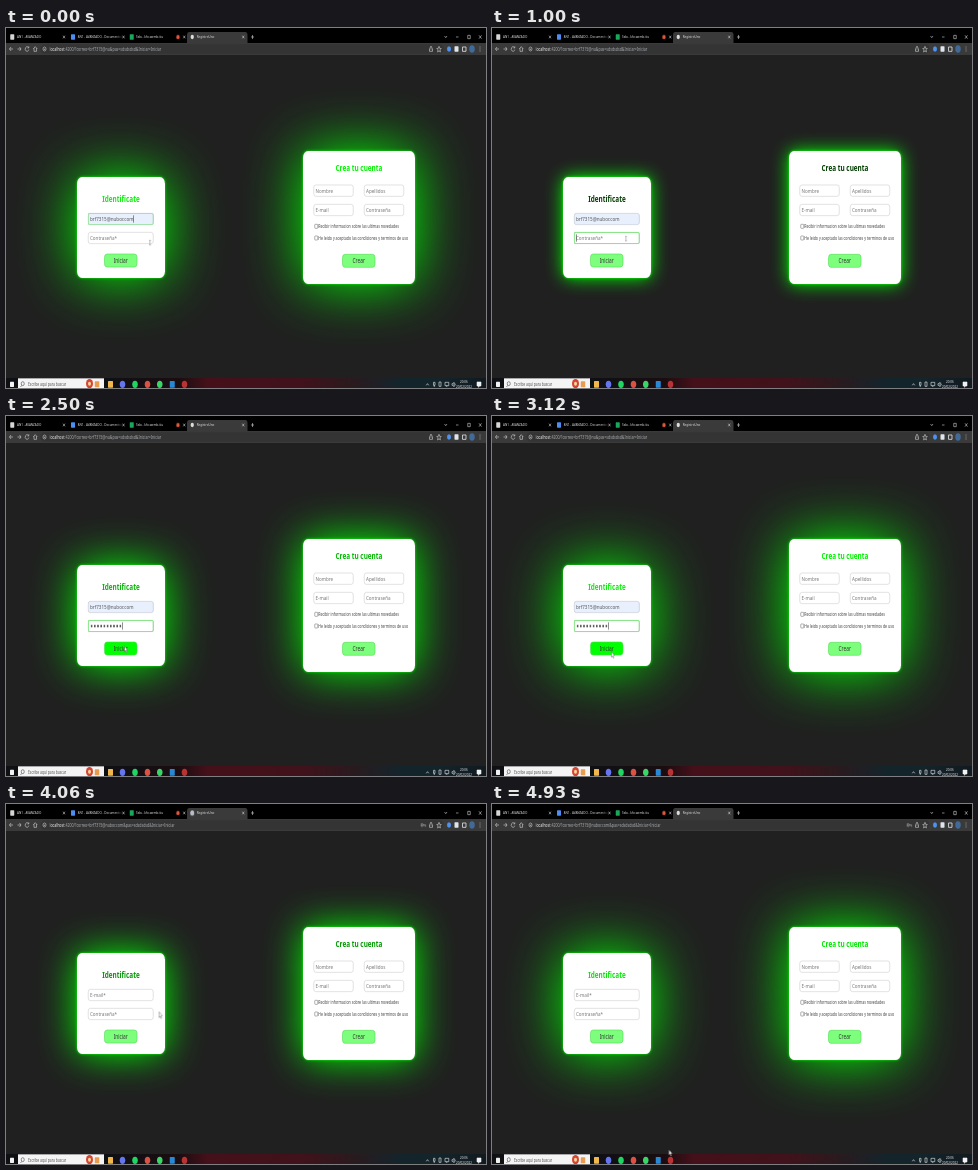
An HTML page for the animation above (5 s loop, 480 by 360 pixels).

```html
<!DOCTYPE html>
<html lang="es">
<head>
<meta charset="utf-8">
<title>RegistroUno</title>
<style>
@property --g { syntax: "<number>"; inherits: true; initial-value: 1; }

html, body { margin: 0; width: 100%; height: 100%; overflow: hidden; background: #202020; }

/* A 1920 x 1080 desktop squeezed into a 4:3 stage */
#desk {
  position: absolute; left: 0; top: 0; width: 1920px; height: 1080px;
  transform: scale(.25, .3333333); transform-origin: 0 0;
  overflow: hidden; background: #202020;
  font: 18.2px/1 "Noto Sans", "Open Sans", sans-serif;
  animation: glow 5s infinite;
}
#desk * { position: absolute; box-sizing: border-box; white-space: nowrap; }
#desk svg * { position: static; }

/* The page reloads at 64% and the glow starts over */
@keyframes glow {
  0% { --g: 1; animation-timing-function: ease-in-out; }
  30.4% { --g: 0; animation-timing-function: ease-in-out; }
  60.4% { --g: 1; animation-timing-function: ease-in; }
  64% { --g: .97; animation-timing-function: step-end; }
  64.01% { --g: 0; animation-timing-function: ease-in-out; }
  94% { --g: 1; animation-timing-function: ease-in; }
  100% { --g: .92; }
}

.t { left: calc(var(--x) * 1px); top: calc(var(--y) * 1px); transform: translateY(-50%); line-height: 1.3; }
.mid { left: 0; width: 100%; text-align: center; }
.dot, .sq {
  left: calc(var(--x) * 1px); top: calc(var(--y) * 1px);
  width: var(--s, 16px); height: var(--s, 16px);
  transform: translate(-50%, -50%); background: var(--c);
}
.dot { border-radius: 50%; }
.sq { border-radius: 2px; }

/* Browser */
#tabs { left: 0; top: 0; width: 1920px; height: 46px; background: #000; font-size: 12px; color: #dcdee1; }
#active { left: 724px; top: 12px; width: 242px; height: 34px; border-radius: 8px 8px 0 0; background: #3a3a3a; }
#bar { left: 0; top: 45px; width: 1920px; height: 36px; background: #3a3a3a; }
#omni { left: 138px; top: 4px; width: 1612px; height: 28px; border-radius: 14px; background: #343434; }
#bar .t { font-size: 14.2px; color: #a9acb0; }
#bar b { position: static; font-weight: 400; color: #f0f0f0; }
.cut { width: 180px; overflow: hidden; -webkit-mask: linear-gradient(90deg, #000 85%, transparent); mask: linear-gradient(90deg, #000 85%, transparent); }
.line { left: 0; top: 0; fill: none; stroke: #d5d7da; stroke-width: 2; }

/* Forms */
.card {
  border-radius: 20px; background: #fff;
  box-shadow: 0 0 10px #0f0, 0 0 calc(20px + var(--g) * 180px) #0f0;
}
#login { left: 284px; top: 447px; width: 352px; height: 303px; }
#join { left: 1188px; top: 369px; width: 448px; height: 399px; }
.card h2 { margin: 0; font-size: 25.6px; font-weight: 600; color: rgb(0 calc(var(--g) * 245) 0); }
.in {
  left: calc(var(--x) * 1px); top: calc(var(--y) * 1px); width: 160px; height: 36px;
  border: 2px solid #cecece; border-radius: 9px; background: #fff;
  color: #777; line-height: 31px; padding-left: 6px;
}
#login .in { width: 262px; }
.btn {
  left: calc(var(--x) * 1px); top: calc(var(--y) * 1px); width: 132px; height: 41px;
  border: 2px solid #50dc50; border-radius: 11px; background: #7dff7d;
  color: #333; font-size: 19.3px; line-height: 36px; text-align: center;
}
.box { left: 46px; width: 14px; height: 14px; border: 2px solid #777; border-radius: 3px; transform: translateY(-50%); }
.terms { font-size: 14.2px; color: #444; }

.full { inset: -2px; border-radius: 9px; border: 2px solid #c6cbd6; background: #e8f0fe; color: #555; line-height: 31px; padding-left: 6px; }
.focus { inset: -2px; border: 2px solid #2be32b; border-radius: 4px; }
.focus.first { border-color: #6fe66f; }
.caret { top: 5px; height: 22px; border-left: 2px solid #222; }
#dots {
  left: 6px; top: 5px; height: 22px; border-right: 2px solid #222;
  background: radial-gradient(circle, #222 3px, transparent 3.8px) 0 0 / 12.8px 22px;
  animation: type 5s infinite, pass 5s step-end infinite;
}
@keyframes type {
  0%, 21.6% { width: 2px; animation-timing-function: steps(10); }
  40.8%, 100% { width: 130px; }
}
@keyframes pass { 0% { opacity: 0; } 12% { opacity: 1; } 64%, 100% { opacity: 0; } }
@keyframes before { 0% { opacity: 1; } 64%, 100% { opacity: 0; } }
@keyframes after { 0% { opacity: 0; } 64%, 100% { opacity: 1; } }
@keyframes first { 0% { opacity: 1; } 12%, 100% { opacity: 0; } }
@keyframes hint { 0% { opacity: 1; } 23.5% { opacity: 0; } 64%, 100% { opacity: 1; } }
@keyframes hover { 0% { background: #7dff7d; } 31% { background: #0f0; } 78%, 100% { background: #7dff7d; } }
@keyframes rec { 0% { opacity: 1; } 30% { opacity: .15; } 38%, 100% { opacity: 1; } }
@keyframes globe { 0% { opacity: 0; } 64% { opacity: 1; } 92%, 100% { opacity: 0; } }
@keyframes beam { 0% { opacity: 1; } 26%, 100% { opacity: 0; } }
@keyframes arrow { 0% { opacity: 0; } 26%, 100% { opacity: 1; } }
.before, .after, .first, .hint, .hover, .rec, .globe, .pass, .beam, .arrow {
  animation: 5s step-end infinite;
}
.before { animation-name: before; }
.after { animation-name: after; }
.first { animation-name: first; }
.hint { animation-name: hint; }
.hover { animation-name: hover; }
.rec { animation-name: rec; }
.globe { animation-name: globe; }
.pass { animation-name: pass; }
.beam { animation-name: beam; }
.arrow { animation-name: arrow; }

/* Taskbar */
#task { left: 0; top: 1050px; width: 1920px; height: 30px; background: linear-gradient(90deg, #0e1014 20%, #1a0d10 36%, #45101a 42%, #40121b 62%, #2a1a1e 72%, #14242b 82%, #14242b 90%, #101a20); color: #eee; font-size: 12px; }
#find { left: 48px; top: 1px; width: 344px; height: 29px; background: #f4f4f4; }
#find .t { font-size: 13.3px; color: #555; }

#mouse { left: 0; top: 0; width: 24px; height: 26px; overflow: visible; animation: move 5s ease-in-out infinite; }
@keyframes move {
  0%, 5% { transform: translate(576px, 642px); }
  12%, 22% { transform: translate(536px, 630px); }
  32%, 41% { transform: translate(512px, 706px); }
  48%, 56% { transform: translate(474px, 690px); }
  64%, 76% { transform: translate(478px, 708px); }
  86%, 90% { transform: translate(728px, 551px); }
  98%, 100% { transform: translate(708px, 1037px); }
}
</style>
</head>
<body>
<div id="desk">
  <div id="tabs">
    <div id="active"></div>
    <i class="sq" style="--x:25;--y:27;--c:#d6d6d6"></i>
    <span class="t" style="--x:44;--y:27">AN1 - AVANZADO</span>
    <i class="sq" style="--x:268;--y:27;--c:#4b8df0"></i>
    <span class="t cut" style="--x:286;--y:27">AN1 - AVANZADO - Documentos de clase</span>
    <i class="sq" style="--x:503;--y:27;--c:#19a75a"></i>
    <span class="t" style="--x:520;--y:27">Sala - kfo-wemb-tiu</span>
    <i class="dot rec" style="--x:688;--y:27;--c:#e8593e;--s:13px"></i>
    <i class="dot" style="--x:745;--y:27;--c:#ddd;--s:13px"></i>
    <i class="dot globe" style="--x:745;--y:27;--c:#b9bec5"></i>
    <span class="t" style="--x:763;--y:27">RegistroUno</span>
    <svg class="line" width="1920" height="46">
      <path d="M228 23l8 8m0-8l-8 8M466 23l8 8m0-8l-8 8M709 23l8 8m0-8l-8 8M945 23l8 8m0-8l-8 8M980 27h12m-6-6v12"/>
      <path d="M1754 24l5 5 5-5M1800 27h10M1847 22h10v10h-10zM1892 22l10 10m0-10l-10 10"/>
    </svg>
  </div>
  <div id="bar">
    <div id="omni"></div>
    <svg class="line" width="1920" height="36">
      <path d="M28 18H14m6-6l-6 6 6 6M46 18h14m-6-6l6 6-6 6M90 14a7 7 0 1 0 1 6m0-10v5h-5M109 18l8-7 8 7m-13-2v9h10v-9"/>
      <circle cx="154" cy="18" r="6"/><path d="M154 17v4"/>
      <path d="M1694 16v9h12v-9m-6 4V10m-4 4l4-4 4 4"/>
      <path d="M1732 10l2.5 6 6.5.5-5 4 1.6 6.5-5.6-3.5-5.6 3.5 1.6-6.5-5-4 6.5-.5z"/>
      <path d="M1826 12h14v13h-14zM1896 11v2m0 4v2m0 4v2" stroke-width="3"/>
      <g class="after"><circle cx="1664" cy="18" r="4"/><path d="M1668 18h10v5"/></g>
    </svg>
    <span class="t before" style="--x:174;--y:18"><b>localhost</b>:4200/?correo=brf7315@nu&amp;pas=sdsdsdsd&amp;Iniciar=Iniciar</span>
    <span class="t after" style="--x:174;--y:18"><b>localhost</b>:4200/?correo=brf7315@nubor.com&amp;pas=sdsdsdsd&amp;Iniciar=Iniciar</span>
    <i class="dot" style="--x:1772;--y:18;--c:#4d92ef"></i>
    <i class="sq" style="--x:1802;--y:18;--c:#dfe5ec"></i>
    <i class="dot" style="--x:1864;--y:18;--c:#406b99;--s:22px"></i>
  </div>

  <div id="login" class="card">
    <h2 class="t mid" style="--y:66">Identificate</h2>
    <div class="in" style="--x:44;--y:108">E-mail*
      <div class="full before">brf7315@nubor.com<i class="caret first"></i></div>
      <div class="focus first"></div>
    </div>
    <div class="in" style="--x:44;--y:165"><span class="hint">Contraseña*</span>
      <div class="focus pass"></div>
      <div id="dots"></div>
    </div>
    <div class="btn hover" style="--x:109;--y:230">Iniciar</div>
  </div>

  <div id="join" class="card">
    <h2 class="t mid" style="--y:51">Crea tu cuenta</h2>
    <div class="in" style="--x:42;--y:101">Nombre</div>
    <div class="in" style="--x:244;--y:101">Apellidos</div>
    <div class="in" style="--x:42;--y:159">E-mail</div>
    <div class="in" style="--x:244;--y:159">Contraseña</div>
    <i class="box" style="top:226px"></i>
    <span class="t terms" style="--x:61;--y:227">Recibir informacion sobre las ultimas novedades</span>
    <i class="box" style="top:261px"></i>
    <span class="t terms" style="--x:61;--y:262">He leido y aceptado las condiciones y terminos de uso</span>
    <div class="btn" style="--x:157;--y:309">Crear</div>
  </div>

  <div id="task">
    <i class="sq" style="--x:24;--y:19;--c:#f2f2f2"></i>
    <div id="find">
      <span class="t" style="--x:40;--y:18">Escribe aquí para buscar</span>
      <svg class="line" width="344" height="29" style="stroke:#444"><circle cx="19" cy="16" r="6"/><path d="M15 21l-5 5"/></svg>
      <i class="dot" style="--x:286;--y:16;--c:#d8442f;--s:28px"></i>
      <i class="dot" style="--x:286;--y:16;--c:#f4d6a0;--s:12px"></i>
      <i class="sq" style="--x:316;--y:18;--c:#e99c50;--s:18px"></i>
    </div>
    <i class="sq" style="--x:418;--y:19;--c:#f0b84a;--s:20px"></i>
    <i class="dot" style="--x:466;--y:19;--c:#6575ef;--s:22px"></i>
    <i class="dot" style="--x:516;--y:19;--c:#20d663;--s:22px"></i>
    <i class="dot" style="--x:566;--y:19;--c:#dd5044;--s:22px"></i>
    <i class="dot" style="--x:615;--y:19;--c:#38d567;--s:22px"></i>
    <i class="sq" style="--x:665;--y:19;--c:#2689d8;--s:20px"></i>
    <i class="dot" style="--x:714;--y:19;--c:#b83434;--s:22px"></i>
    <svg class="line" width="1920" height="30" style="stroke:#f2f2f2">
      <path d="M1681 22l5-5 5 5M1710 13h6v9h-6zM1713 22v5M1732 12v13h8V12zM1756 13h15v10h-15zm7 10v4M1784 17h3l5-4v13l-5-4h-3zm11-1q4 4 0 7"/>
      <path d="M1884 12h16v12h-6l-4 4v-4h-6z" fill="#f2f2f2"/>
    </svg>
    <span class="t" style="--x:1816;--y:11">20:06</span>
    <span class="t" style="--x:1800;--y:25">20/02/2022</span>
  </div>

  <svg id="mouse" viewBox="0 0 24 26">
    <path class="beam" d="M-3-5h6M0-5V9M-3 9h6" fill="none" stroke="#666" stroke-width="1.600"/>
    <path class="arrow" d="M0 0v17l4-4 3 7 3-1.500-3-6.500h6z" fill="#fff" stroke="#222"/>
  </svg>
</div>
</body>
</html>
```
